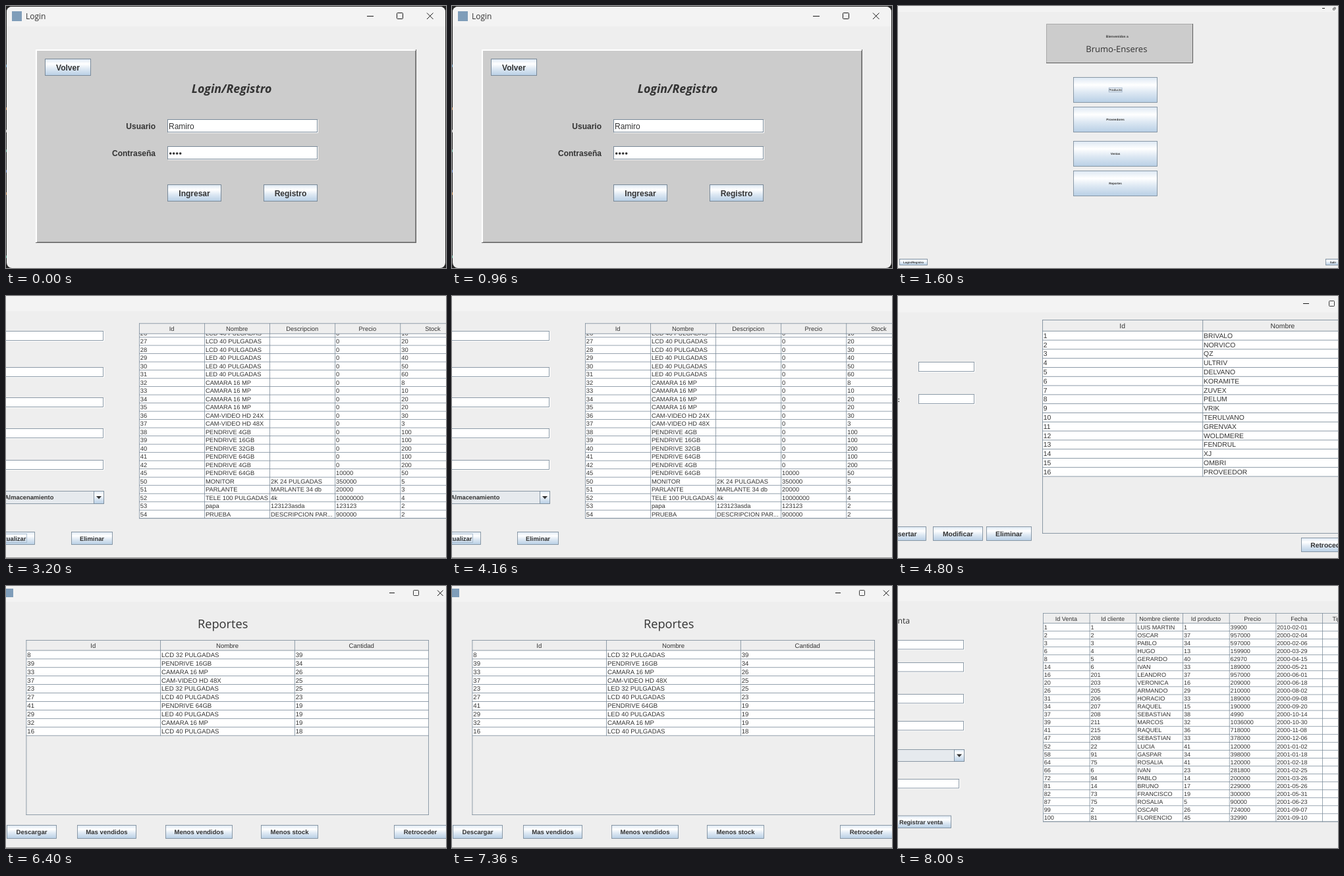
Animation, 668 px wide and 398 px high, one loop 9.6 s. Source, as an HTML page:

```html
<!DOCTYPE html>
<html lang="es">
<head>
<meta charset="utf-8">
<title>Login</title>
<style>
  html, body { margin: 0; width: 100%; height: 100%; overflow: hidden; background: #eee; }
  svg { display: block; width: 668px; height: 398px; }
  text { font-family: "Liberation Sans", Arial, sans-serif; fill: #333; white-space: pre; }
  .bold { font-weight: 700; }
  .ui { font-family: "Open Sans", "Noto Sans", sans-serif; }
  .title { font-family: "Open Sans", "Noto Sans", sans-serif; font-weight: 700; font-style: italic; }
  .scene { visibility: hidden; animation: show 9.6s step-end infinite; }
  /* every window but the first is shown scaled down */
  .scene:not(:first-of-type) text { text-rendering: geometricPrecision; }
  .scene:not(:first-of-type) rect { stroke-width: .85; }
  @keyframes show {
    0% { visibility: visible; }
    16.666%, 100% { visibility: hidden; }
  }
</style>
</head>
<body>
<svg id="stage" viewBox="0 0 668 398" xmlns="http://www.w3.org/2000/svg"></svg>
<script>
const EDGE = '#7a8a99';

const rect = (x, y, w, h, fill, extra = '') =>
  `<rect x="${x}" y="${y}" width="${w}" height="${h}" fill="${fill}" ${extra}/>`;
const box = (x, y, w, h, fill, stroke = EDGE) =>
  rect(x + .5, y + .5, w - 1, h - 1, fill, `stroke="${stroke}"`);
const path = (d, stroke = '#1a1a1a', width = 1) =>
  `<path d="${d}" fill="none" stroke="${stroke}" stroke-width="${width}"/>`;
const text = (x, y, size, label, cls = '', anchor = 'start') =>
  `<text x="${x}" y="${y}" font-size="${size}" class="${cls}" text-anchor="${anchor}">${label}</text>`;

const button = (x, y, w, h, label, size) =>
  box(x, y, w, h, 'url(#metal)') +
  text(x + w / 2, y + h / 2 + size * .38, size, label, 'bold', 'middle');

const field = (x, y, w, h) =>
  rect(x + 1, y + 1, w, h, '#fff') + box(x, y, w, h, '#fff');

const combo = (right, y, h) => {
  const x = right - 16, mid = y + h / 2;
  return box(-20, y, right + 20, h, '#e6eaee') + box(x, y, 16, h, 'url(#metal)') +
    `<path d="M${x + 4} ${mid - 2}h8l-4 4.5z" fill="#333"/>`;
};

const windowBar = h => rect(0, 0, 668, 398, '#eee') + rect(0, 0, 668, h, '#f3f3f3');
const minimize = (x, y, w) => path(`M${x} ${y + .5}h${w}`);
const maximize = (x, y, w) =>
  rect(x + .5, y + .5, w, w, 'none', 'stroke="#1a1a1a" rx="1"');
const close = (x, y, w) => path(`M${x} ${y}l${w} ${w}m0 ${-w}l${-w} ${w}`);
const bottomLine = () => rect(0, 397, 668, 1, '#9a9a9a');

// columns: cell texts per column; "first" may be negative to show a row scrolled under the header
function table({ x, y, head, row, size, colWidth, titles, columns, first = 0, bottom, right = 700 }) {
  const top = y + head, count = columns[0].length;
  const end = top + first + count * row, base = bottom || end;
  const line = row / 16;
  const edge = i => x + i * colWidth;
  const across = bottomY => rect(x, bottomY - line, right - x, line, EDGE);
  const down = (lineX, to) => rect(lineX, y, line, to - y, EDGE);
  let out = rect(x, top, right - x, end - top, '#fff');
  columns.forEach((cells, c) => cells.forEach((cell, r) => {
    out += text(edge(c) + 1.8, top + first + (r + .73) * row, size, cell);
  }));
  for (let r = 1; r <= count; r++) out += across(top + first + r * row);
  out += rect(x, y, right - x, head, '#eee');
  titles.forEach((title, c) => {
    out += text(x + (c + .5) * colWidth, y + head / 2 + size * .42, size, title, '', 'middle');
  });
  out += across(y + line) + across(top);
  for (let c = 1; c < titles.length; c++) out += down(edge(c), end);
  return out + down(x, base) + down(right - line, base) + across(base);
}

const words = s => s.split(' ');
const lines = s => s.split(',');
const repeat = (n, s) => Array(n).fill(s);
const range = (from, to) => Array.from({ length: to - from + 1 }, (_, i) => from + i);

function login() {
  const specks = [[89, '#4a83a8'], [154, '#b5763c'], [188, '#bbb'], [218, '#4f9c88'],
    [249, '#4a6fb0'], [283, '#b5763c'], [379, '#4f9c88']];
  const dots = range(0, 3).map(i => `<circle cx="${249.7 + i * 5}" cy="224" r="1.8" fill="#333"/>`);
  return rect(0, 0, 668, 398, '#242424') +
    specks.map(([y, color]) => rect(0, y, 1, 4, color)).join('') +
    rect(1, 1, 666, 397, '#eee', 'rx="8"') +
    `<path d="M1 31V9a8 8 0 0 1 8-8h650a8 8 0 0 1 8 8v22z" fill="#f3f3f3"/>` +
    rect(9, 8, 15, 15, '#7f9db9') +
    text(30, 20, 12, 'Login', 'ui') +
    minimize(548, 15, 10) + maximize(593, 10, 9) + close(639, 10.5, 9.5) +
    rect(45, 66, 578, 294, '#666') + rect(45, 66, 577, 293, '#fff') +
    rect(47, 68, 575, 291, '#8c8c8c') + rect(47, 68, 574, 290, '#ccc') +
    button(59, 80, 70, 26, 'Volver', 12) +
    text(342.5, 132, 17.8, 'Login/Registro', 'title', 'middle') +
    text(227, 187, 12, 'Usuario', 'bold', 'end') +
    text(227, 228, 12, 'Contraseña', 'bold', 'end') +
    field(245, 172, 228, 20) + field(245, 213, 228, 20) +
    text(247, 187, 12, 'Ramiro') + dots.join('') +
    button(245, 271, 82, 26, 'Ingresar', 12) + button(391, 271, 82, 26, 'Registro', 12);
}

function menu() {
  return windowBar(9) + minimize(644, 3, 4) +
    path('M660.5 3.5h2.5v2.5h-2.5zM661.5 2.2h2.7v2.7', '#333', .7) +
    rect(225, 27, 223, 60, '#ccc') +
    path('M225.5 87V27.5H447', '#aaa') + path('M225 86.5H447.5V27', '#5c5c5c') +
    text(332.8, 47.5, 5, 'Bienvenidos a', 'bold', 'middle') +
    text(331.8, 70, 13, 'Brumo-Enseres', 'ui', 'middle') +
    button(266, 108, 128, 39, 'Producto', 4.55) +
    rect(320.3, 124.3, 19.8, 6.4, 'none', 'stroke="#9eb0c4"') +
    button(266, 153, 128, 39, 'Proveedores', 4.55) +
    button(266, 205, 128, 39, 'Ventas', 4.55) +
    button(266, 250, 128, 39, 'Reportes', 4.55) +
    button(2, 384, 43, 10, 'Login/Registro', 4.4) +
    button(649, 384, 23, 10, 'Salir', 4.4);
}

function products() {
  const names = [...repeat(3, 'LCD 40 PULGADAS'), ...repeat(3, 'LED 40 PULGADAS'),
    ...repeat(4, 'CAMARA 16 MP'),
    ...lines('CAM-VIDEO HD 24X,CAM-VIDEO HD 48X,PENDRIVE 4GB,PENDRIVE 16GB,PENDRIVE 32GB,' +
      'PENDRIVE 64GB,PENDRIVE 4GB,PENDRIVE 64GB,MONITOR,PARLANTE,TELE 100 PULGADAS,papa,PRUEBA')];
  return windowBar(23) +
    [53, 108, 154, 201, 249].map(y => field(-20, y, 168, 15)).join('') +
    combo(149, 296, 20) + text(72.3, 309, 9.3, 'Almacenamiento', 'bold', 'end') +
    button(-28, 358, 72, 20, 'Actualizar', 9.4) +
    rect(-16, 361.5, 47.5, 13, 'none', 'stroke="#a3b8cc"') +
    button(99, 358, 63, 20, 'Eliminar', 9.4) +
    table({
      x: 202, y: 41.4, head: 16.2, row: 12.51, size: 9.35, colWidth: 99.1, first: -7.2,
      titles: words('Id Nombre Descripcion Precio Stock'),
      columns: [
        [...range(26, 42), 45, ...range(50, 54)],
        names,
        [...repeat(18, ''), ...lines('2K 24 PULGADAS,MARLANTE 34 db,4k,123123asda,DESCRIPCION PAR...')],
        [...repeat(17, '0'), ...words('10000 350000 20000 10000000 123123 900000')],
        words('10 20 30 40 50 60 8 10 20 20 30 3 100 100 200 100 200 50 5 3 4 2 2')
      ]
    }) + bottomLine();
}

function suppliers() {
  return windowBar(25) + minimize(615, 11, 9) + maximize(654, 7, 8) +
    field(31, 100, 85, 15) + field(31, 149, 85, 15) +
    text(3, 161, 10.35, ':', 'bold', 'end') +
    table({
      x: 219, y: 36, head: 17.7, row: 13.8, size: 10.35, colWidth: 243.3, bottom: 361,
      titles: ['Id', 'Nombre'],
      columns: [range(1, 16), words('BRIVALO NORVICO QZ ULTRIV DELVANO KORAMITE ZUVEX PELUM VRIK ' +
        'TERULVANO GRENVAX WOLDMERE FENDRUL XJ OMBRI PROVEEDOR')]
    }) +
    button(-24, 350, 67, 22, 'Insertar', 10.35) +
    button(53, 350, 76, 22, 'Modificar', 10.35) +
    button(134, 350, 69, 22, 'Eliminar', 10.35) +
    button(612, 367, 83, 22, 'Retroceder', 10.35);
}

function reports() {
  return windowBar(24) + rect(-2, 4, 13, 13, '#7f9db9') +
    minimize(582, 10, 8) + maximize(618, 6, 8) + close(655, 6.5, 8.5) +
    text(329.2, 64, 18.2, 'Reportes', 'ui', 'middle') +
    table({
      x: 30.5, y: 82, head: 16.3, row: 12.93, size: 9.6, colWidth: 203.7, bottom: 348, right: 642,
      titles: words('Id Nombre Cantidad'),
      columns: [
        words('8 39 33 37 23 27 41 29 32 16'),
        lines('LCD 32 PULGADAS,PENDRIVE 16GB,CAMARA 16 MP,CAM-VIDEO HD 48X,LED 32 PULGADAS,' +
          'LCD 40 PULGADAS,PENDRIVE 64GB,LED 40 PULGADAS,CAMARA 16 MP,LCD 40 PULGADAS'),
        words('39 34 26 25 25 23 19 19 19 18')
      ]
    }) +
    button(1, 363, 76, 21, 'Descargar', 9.6) +
    button(108, 363, 90, 21, 'Mas vendidos', 9.6) +
    button(242, 363, 102, 21, 'Menos vendidos', 9.6) +
    button(387, 363, 87, 21, 'Menos stock', 9.6) +
    button(589, 363, 80, 21, 'Retroceder', 9.6) + bottomLine();
}

function sales() {
  return windowBar(23) + text(18, 57, 12.2, 'Venta', 'ui', 'end') +
    [82, 116, 164, 205].map(y => field(-20, y, 120, 14.5)).join('') +
    combo(101, 248, 19) + field(-20, 293, 113, 14.5) +
    button(-11, 348.5, 92, 19.5, 'Registrar venta', 9.1) +
    table({
      x: 220, y: 41, head: 15.8, row: 12.06, size: 9.05, colWidth: 70.7,
      titles: lines('Id Venta,Id cliente,Nombre cliente,Id producto,Precio,Fecha,Tipo pago'),
      columns: [
        words('1 2 3 6 8 14 16 20 26 31 34 37 39 41 47 52 58 64 66 72 81 82 87 99 100'),
        words('1 2 3 4 5 6 201 203 205 206 207 208 211 215 208 22 91 75 6 94 14 73 75 2 81'),
        lines('LUIS MARTIN,OSCAR,PABLO,HUGO,GERARDO,IVAN,LEANDRO,VERONICA,ARMANDO,HORACIO,RAQUEL,' +
          'SEBASTIAN,MARCOS,RAQUEL,SEBASTIAN,LUCIA,GASPAR,ROSALIA,IVAN,PABLO,BRUNO,FRANCISCO,' +
          'ROSALIA,OSCAR,FLORENCIO'),
        words('1 37 34 13 40 33 37 16 29 33 15 38 32 36 33 41 34 41 23 14 17 19 5 26 45'),
        words('39900 957000 597000 159900 62970 189000 957000 209000 210000 189000 190000 4990 ' +
          '1036000 718000 378000 120000 398000 120000 281800 200000 229000 300000 90000 724000 32990'),
        words('2010-02-01 2000-02-04 2000-02-06 2000-03-29 2000-04-15 2000-05-21 2000-06-01 ' +
          '2000-06-18 2000-08-02 2000-09-08 2000-09-20 2000-10-14 2000-10-30 2000-11-08 2000-12-06 ' +
          '2001-01-02 2001-01-18 2001-02-18 2001-02-25 2001-03-26 2001-05-26 2001-05-31 2001-06-23 ' +
          '2001-09-07 2001-09-10')
      ]
    });
}

const scenes = [login, menu, products, suppliers, reports, sales];
const gradient = `<defs><linearGradient id="metal" x2="0" y2="1">
  <stop stop-color="#dde8f3"/><stop offset=".3" stop-color="#fff"/>
  <stop offset=".6" stop-color="#dde8f3"/><stop offset="1" stop-color="#b8cfe5"/>
</linearGradient></defs>`;

document.getElementById('stage').innerHTML = gradient + scenes.map((draw, i) =>
  `<g class="scene" style="animation-delay:${(i - scenes.length) * 1600}ms">${draw()}</g>`).join('');
</script>
</body>
</html>
```
